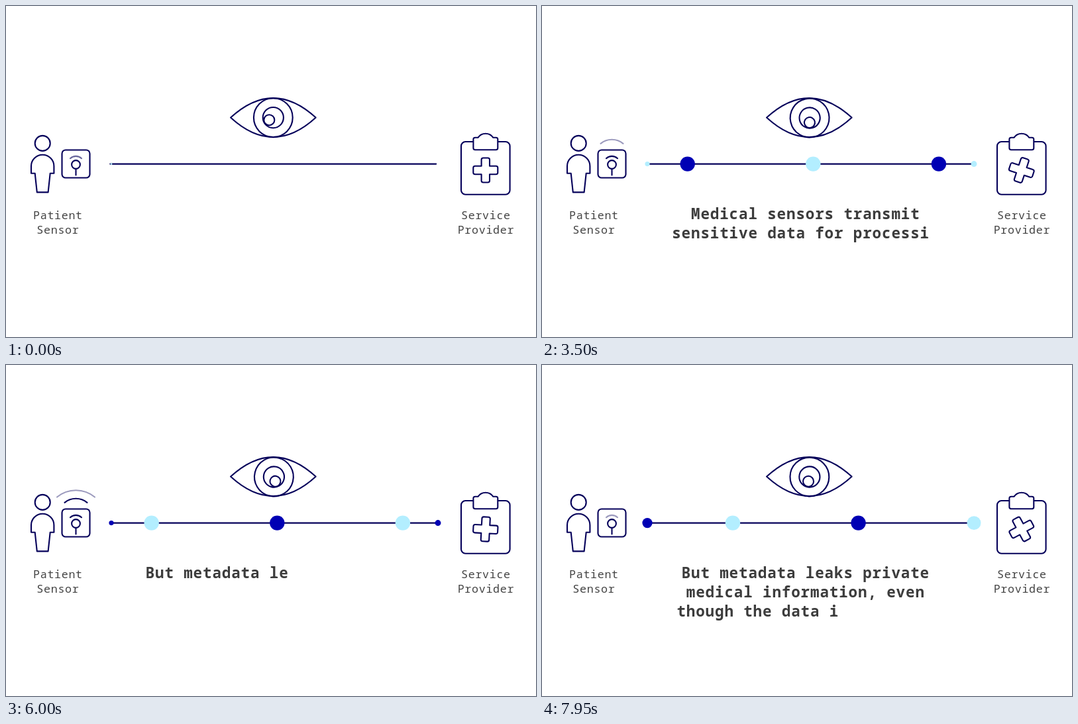
Write an HTML page that moves like this. It is 800 by 500 pixels and loops after 8000 ms.

```html
<!DOCTYPE html>
<html lang="en">
<head>
<meta charset="utf-8">
<title>Sensor data in transit</title>
<style>
  html, body { margin: 0; width: 100%; height: 100%; overflow: hidden; background: #fff; }
  svg { display: block; width: 800px; height: 500px; }
  .ink { fill: none; stroke: #05005a; stroke-width: 2.1; stroke-linecap: round; stroke-linejoin: round; }
  text { font-family: "Noto Sans Mono", "DejaVu Sans Mono", monospace; letter-spacing: .04em; fill: #444; white-space: pre; }
  #caption text { font-size: 22.5px; font-weight: 700; fill: #3c3c3c; }
  #labels text { font-size: 16.7px; text-anchor: middle; }
</style>
</head>
<body>
<svg viewBox="0 0 800 500">
  <g class="ink">
    <!-- patient -->
    <circle cx="55.2" cy="207.4" r="11.5"/>
    <path d="M43.7 252.7H38V242a17.2 17.2 0 0 1 34.4 0V252.7H66.7L63.6 281.4H46.8L43.7 252.7"/>
    <!-- sensor -->
    <rect x="84.5" y="217.5" width="42" height="42" rx="5.5"/>
    <circle cx="105.5" cy="239.5" r="6.4"/>
    <path d="M105.5 246V255.5"/>
    <g id="waves">
      <path d="M97 230.2A12.6 12.6 0 0 1 114 230.2"/>
      <path d="M88.5 207.9A26.6 26.6 0 0 1 122.5 207.9"/>
      <path d="M77 199.5A44.5 44.5 0 0 1 134 199.5"/>
    </g>
    <!-- clipboard -->
    <rect x="687" y="205" width="73.6" height="79.7" rx="6.5"/>
    <path fill="#fff" d="M705.4 214.6V201.5q0-2.7 2.7-2.7H712.4A14 14 0 0 1 735.4 198.8H739.6q2.7 0 2.7 2.7V214.6q0 2.7-2.7 2.7H708.1q-2.7 0-2.7-2.7Z"/>
    <path id="cross" d="M-6.2-6.2V-15.8a2.7 2.7 0 0 1 2.7-2.7H3.5a2.7 2.7 0 0 1 2.7 2.7V-6.2H15.8a2.7 2.7 0 0 1 2.7 2.7V3.5a2.7 2.7 0 0 1-2.7 2.7H6.2V15.8a2.7 2.7 0 0 1-2.7 2.7H-3.5a2.7 2.7 0 0 1-2.7-2.7V6.2H-15.8a2.7 2.7 0 0 1-2.7-2.7V-3.5a2.7 2.7 0 0 1 2.7-2.7Z"/>
    <!-- eye -->
    <path d="M339.1 168.6Q403.3 109.6 467.6 168.6Q403.3 227.6 339.1 168.6Z"/>
    <g id="iris">
      <circle cx="403.3" cy="168.6" r="29.4"/>
      <circle cx="403.3" cy="168.6" r="15.6"/>
      <circle cx="397.3" cy="172.2" r="8"/>
    </g>
    <path d="M157.3 238.6H649.2"/>
  </g>
  <g id="dots"></g>
  <g id="labels">
    <text x="78.4" y="322.3">Patient</text>
    <text x="78.4" y="343.6">Sensor</text>
    <text x="724.4" y="322.3">Service</text>
    <text x="724.4" y="343.6">Provider</text>
  </g>
  <g id="caption"><text y="322"/><text y="350.8"/><text y="379.6"/></g>
</svg>
<script>
const $ = id => document.getElementById(id);
const clamp = v => Math.max(0, Math.min(1, v));
const smooth = v => { const u = clamp(v); return u * u * (3 - 2 * u); };
const LOOP = 8000, STEP = 50, FPS = 30;

const CHAR = 14.4;
const captions = [
  { start: -3, end: 147, lines: ['Medical sensors transmit ', 'sensitive data for processing'] },
  { start: 147, end: 999, lines: ['But metadata leaks private ', 'medical information, even ', 'though the data is encrypted'] }
];

// Each dot grows at the left end, travels, then shrinks at the right end.
const GROW = 25, TRAVEL = 65, SHRINK = 30, LEFT = 159, RIGHT = 652, RADIUS = 11.2;
const dots = Array.from({ length: 10 }, (_, i) => {
  const dot = document.createElementNS('http://www.w3.org/2000/svg', 'circle');
  dot.setAttribute('cy', 238.6);
  dot.setAttribute('fill', i % 2 ? '#0000b4' : '#b3eeff');
  return $('dots').appendChild(dot);
});

function drawDots(n) {
  dots.forEach((dot, i) => {
    const age = n + 3 - i * 25;
    const scale = clamp(age / GROW) * clamp(1 - (age - GROW - TRAVEL) / SHRINK);
    dot.setAttribute('cx', LEFT + (RIGHT - LEFT) * clamp((age - GROW) / TRAVEL));
    dot.setAttribute('r', RADIUS * scale);
  });
}

function drawWaves(n) {
  const phase = (n + 3) % 40;
  const level = phase < 20 ? phase / 5 : (35 - phase) / 5;
  [...$('waves').children].forEach((arc, i) => arc.setAttribute('opacity', clamp(level - i)));
}

function drawEye(n) {
  const phase = Math.max(0, n - 40.5) % 52;
  const angle = -120 * (1 - Math.abs(phase / 26 - 1));
  $('iris').setAttribute('transform', `rotate(${angle} 404.1 168.1)`);
}

function drawCaption(n) {
  const { start, lines } = captions.find(c => n < c.end);
  const total = lines.join('').length;
  let left = Math.round(total * smooth((n - start) / 120));
  [...$('caption').children].forEach((row, i) => {
    const line = lines[i] || '';
    row.setAttribute('x', 405 - line.length * CHAR / 2);
    row.textContent = line.slice(0, Math.max(0, left));
    left -= line.length;
  });
}

function draw(ms) {
  const shown = Math.floor((ms % LOOP + 1) / STEP) * STEP % LOOP;
  const n = Math.floor(shown * FPS / 1000 + 0.5);
  drawDots(n);
  drawWaves(n);
  drawEye(n);
  drawCaption(n);
  $('cross').setAttribute('transform', `translate(723.8 248) rotate(${Math.max(0, n - 87)})`);
}

const began = performance.now();
function tick() {
  draw(performance.now() - began);
  requestAnimationFrame(tick);
}
tick();
</script>
</body>
</html>
```
